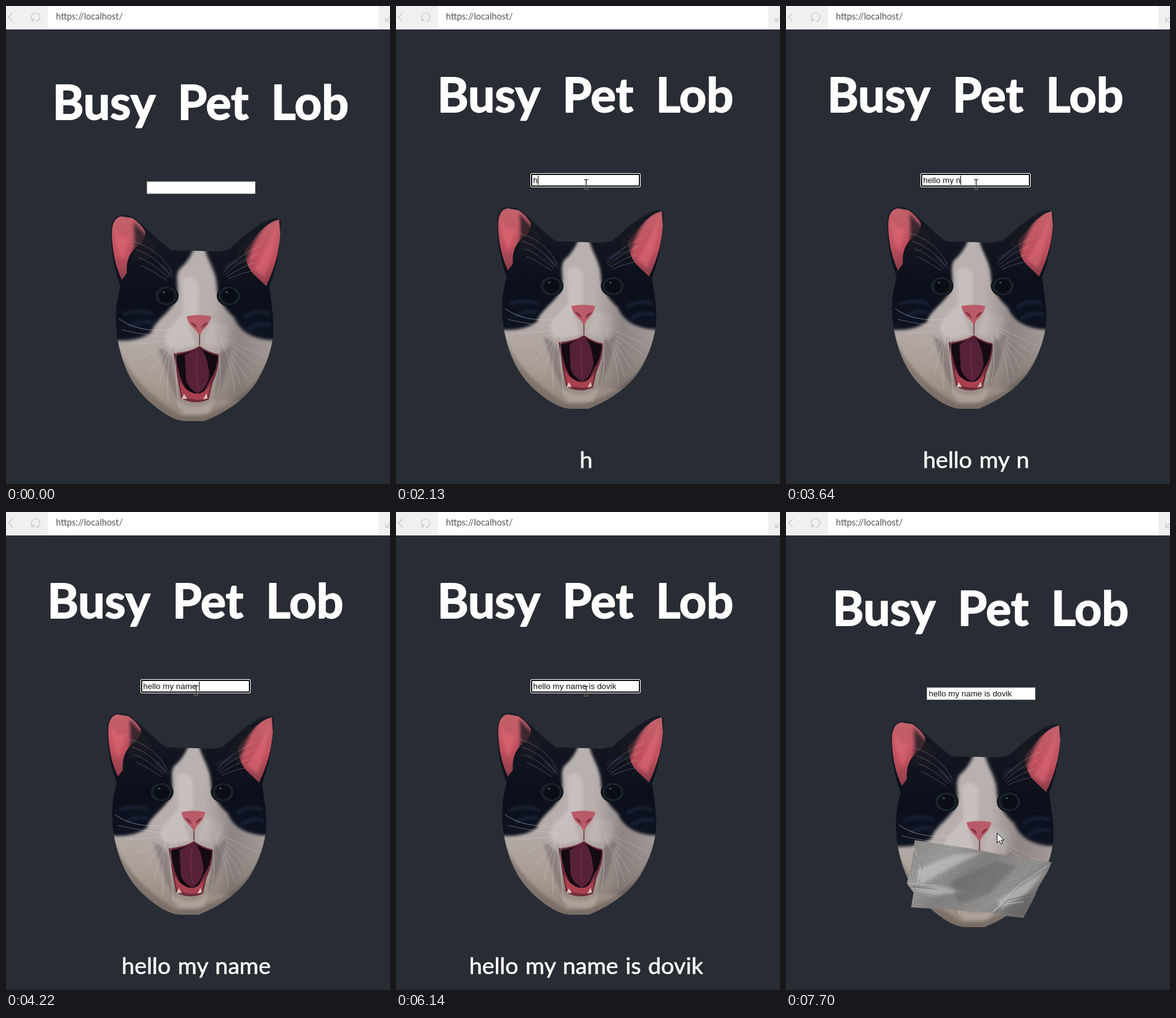
Animation of 623x775 px, one loop 8000 ms. Source, as an HTML page:

```html
<!DOCTYPE html>
<html lang="en">
<head>
<meta charset="utf-8">
<title>Talking cat</title>
<style>
  html, body { margin: 0; width: 100%; height: 100%; overflow: hidden; background: #282c34; }
  svg { display: block; width: 623px; height: 775px; }
  text { white-space: pre; }
  .hand { font-family: Lato, "Open Sans", sans-serif; fill: #fff; stroke: #fff; stroke-linejoin: round; text-anchor: middle; }
  #title { font-size: 77px; font-weight: 700; stroke-width: 1.8; }
  #caption { font-size: 37.5px; word-spacing: 2px; stroke-width: .6; }
  #url { font: 14.4px Lato, sans-serif; fill: #555; }
  #field { font: 13.333px "Liberation Sans", Arial, sans-serif; fill: #111; }
  .icon { fill: none; stroke: #c6c6c6; stroke-width: 1.2; }
</style>
</head>
<body>
<svg viewBox="0 0 623 775">
  <defs>
    <linearGradient id="cream" x1="0" y1="0" x2="0" y2="1">
      <stop offset="0" stop-color="#b9b1b1"/><stop offset=".45" stop-color="#b8aeab"/>
      <stop offset=".75" stop-color="#a89d95"/><stop offset="1" stop-color="#8b7f78"/>
    </linearGradient>
    <linearGradient id="shade" x1="0" y1="0" x2="1" y2="0">
      <stop offset=".5" stop-color="#3d3538" stop-opacity="0"/><stop offset=".72" stop-color="#3d3538" stop-opacity=".32"/>
      <stop offset="1" stop-color="#3d3538" stop-opacity=".12"/>
    </linearGradient>
    <linearGradient id="fur" x1="0" y1="0" x2="0" y2="1">
      <stop offset="0" stop-color="#1a1c26"/><stop offset=".4" stop-color="#0b0f1a"/><stop offset="1" stop-color="#121b30"/>
    </linearGradient>
    <linearGradient id="ear" x1="0" y1="0" x2="0" y2="1">
      <stop offset="0" stop-color="#c2626a"/><stop offset=".6" stop-color="#c04f5d"/><stop offset="1" stop-color="#8a3c49"/>
    </linearGradient>
    <linearGradient id="silver" x1="0" y1="0" x2="1" y2=".6">
      <stop offset="0" stop-color="#8f8d8c"/><stop offset=".28" stop-color="#a6a4a3"/>
      <stop offset=".5" stop-color="#878584"/><stop offset=".78" stop-color="#9b9998"/><stop offset="1" stop-color="#777574"/>
    </linearGradient>
    <radialGradient id="eye">
      <stop offset="0" stop-color="#090c13"/><stop offset=".6" stop-color="#0d131b"/>
      <stop offset=".8" stop-color="#1c2731"/><stop offset="1" stop-color="#05070d"/>
    </radialGradient>
    <pattern id="weave" width="4" height="4" patternUnits="userSpaceOnUse" patternTransform="rotate(9)">
      <path d="M0 0H4M0 0V4" stroke="#4b4947" stroke-opacity=".5"/>
    </pattern>
    <filter id="soft" x="-10%" y="-10%" width="120%" height="120%"><feGaussianBlur stdDeviation="2.4"/></filter>
    <clipPath id="head">
      <path d="M187 339C173 341 169 354 171 382C172 412 179 436 186 455C178 482 176 506 181 540C188 580 202 613 231 640C252 659 272 672 290 673H322C347 663 387 642 408 607C424 580 435 548 434 516C433 492 429 472 427 456C438 428 446 388 446 349Q443 343 433 344C410 351 386 373 361 395L345 398L312 397L268 396C252 384 236 368 217 351Q202 337 187 339Z"/>
    </clipPath>
    <path id="strip" d="M209 532L300 546L368 559L431 568L424 584L410 607L400 630L385 658L350 654L333 650L270 645L203 641L207 617L196 602L204 569Z"/>
    <path id="bar" fill="none" d="M-3.5 -7.5H-1L0 -6.5L1 -7.5H3.5M0 -6.5V6.5M-3.5 7.5H-1L0 6.5L1 7.5H3.5"/>
  </defs>

  <rect width="623" height="775" fill="#282c34"/>
  <rect width="623" height="38" fill="#f0f0f0"/>
  <rect x="68" width="536" height="38" fill="#fff"/>
  <path class="icon" d="M11 11L4 18L11 25M44 23.7A7 7 0 1 1 48.5 25M40.5 24H44.5V20M623 18L616 25M616 19V25H622"/>
  <text id="url" x="81" y="22">https://localhost/</text>

  <g id="title" class="hand">
    <text x="159" y="184">Busy</text><text x="336" y="184">Pet</text><text x="493" y="184">Lob</text>
  </g>

  <g id="cat">
    <g clip-path="url(#head)">
      <rect x="165" y="335" width="285" height="342" fill="url(#fur)"/>
      <path fill="none" stroke="#26344f" stroke-width="5" opacity=".55" filter="url(#soft)" d="M190 500Q215 490 240 500M200 520Q222 508 238 514M385 505Q408 490 428 500M392 525Q412 510 430 518M250 420L272 440M352 425L384 410"/>
      <g filter="url(#soft)">
        <path fill="url(#cream)" d="M306 390H322C326 412 340 428 342 450C342 475 356 492 370 505C380 530 404 542 440 542V680H170V541C195 545 220 541 236 529C240 512 263 499 274 480C284 461 272 442 281 427Q298 413 306 390Z"/>
        <path fill="#d2cbcc" opacity=".6" d="M286 445Q300 430 312 450L312 498L295 512L308 550L278 557Q250 550 261 528L288 498Z"/>
        <path fill="#c9c2c4" opacity=".5" d="M334 512L362 518Q367 548 341 555L318 548Z"/>
        <path fill="#4d4345" opacity=".35" d="M246 553Q275 562 273 590L282 642L268 620ZM346 562L368 549L354 605L338 640Z"/>
        <path fill="#c4bab2" opacity=".5" d="M276 640Q312 662 340 636L330 662H288Z"/>
        <path fill="#5d504b" opacity=".45" d="M176 540Q202 615 284 664H316Q397 638 425 575L440 680H170Z"/>
        <path fill="url(#shade)" d="M275 395H340L346 480L372 505Q384 540 434 542V640H230L275 500Z"/>
      </g>
      <path fill="url(#ear)" d="M187 341Q170 344 172 376Q174 415 188 444L196 433Q194 405 212 390Q226 382 226 366Q218 352 205 344Z"/>
      <path fill="url(#ear)" d="M443 346Q426 350 409 369L387 396Q388 420 402 435L422 454Q442 413 445 370Z"/>
      <g filter="url(#soft)">
        <path fill="#171922" opacity=".8" d="M207 350L246 390L230 412L203 412Q212 387 207 350ZM424 352L372 397L388 427Q398 381 424 352Z"/>
        <path fill="#e06c76" opacity=".6" d="M176 356Q185 380 201 374L190 412Q176 390 176 356ZM440 352Q438 391 419 440L402 426Q424 394 440 352Z"/>
      </g>
    </g>
    <g id="eyes"></g>
    <path fill="#b95b68" d="M293 503Q313 499 333 503Q331 515 319 526L314 535L308 526Q295 515 293 503Z"/>
    <path fill="#6b2835" d="M299 513Q308 514 310 523ZM328 513Q319 514 317 523Z"/>
    <path fill="none" stroke="#794951" stroke-width="2" d="M314 533V550"/>
    <g>
      <path fill="#6f2c3a" d="M272 563Q299 561 314 551Q327 561 346 565Q345 590 335 612L329 638Q306 648 284 636L278 603Z"/>
      <path fill="#140a12" d="M274 566Q302 562 314 553Q326 563 344 567Q342 592 331 606L320 628H294L282 600Z"/>
      <path fill="#552138" d="M290 566Q306 558 314 553Q327 564 330 599Q325 622 311 628Q295 620 292 605Z"/>
      <path fill="none" stroke="#6b2b41" stroke-width="2" d="M310 563Q307 596 312 622"/>
      <path fill="#a8414f" d="M281 607Q294 629 313 629Q326 624 332 612L327 636Q307 642 286 632Z"/>
      <path fill="#d4c3bd" d="M285 637L289 629L294 637ZM320 638L325 628L327 636Z"/>
    </g>
    <g id="whiskers" fill="none" stroke="#d5d0d0" stroke-width="1"></g>
    <g id="tape">
      <use href="#strip" fill="url(#silver)"/>
      <use href="#strip" fill="url(#weave)"/>
      <path fill="#d6d4d3" opacity=".5" filter="url(#soft)" d="M214 580L270 556L316 552L263 579L218 604ZM342 630L376 609L421 581L393 616L349 643ZM206 612L250 606L290 616L240 622Z"/>
      <path fill="#4f4d4b" opacity=".3" filter="url(#soft)" d="M268 600L340 566L374 574L330 618L280 636ZM392 622L410 607L385 656L345 650Z"/>
      <path fill="none" stroke="#d0cecc" opacity=".8" d="M199 602L245 606M207 543L218 574L213 602M424 574L378 604L335 649M333 650L350 637L385 632"/>
      <path fill="none" stroke="#4f4c4a" opacity=".6" d="M203 607L245 612M211 558L221 577M398 620L360 629L338 651"/>
    </g>
  </g>

  <g id="input">
    <rect x="228" y="284" width="177" height="21" fill="#767676"/>
    <rect x="229" y="285" width="175" height="19" fill="#fff"/>
    <g id="ring">
      <rect x="227" y="283" width="179" height="23" rx="3" fill="#fff"/>
      <rect x="228" y="284" width="177" height="21" rx="2" fill="#101010"/>
      <rect x="230" y="286" width="173" height="17" fill="#fff"/>
    </g>
    <text id="field" x="231.5" y="299"></text>
    <rect id="caret" y="287" width="1" height="15" fill="#000"/>
  </g>

  <text id="caption" class="hand" x="308.5" y="749"></text>

  <circle id="halo" r="12" fill="#dedc00" opacity=".8"/>
  <g id="beam">
    <use href="#bar" stroke="#fff" stroke-width="2.4" opacity=".5"/>
    <use href="#bar" stroke="#111" stroke-width="1.2"/>
  </g>
  <path id="arrow" d="M.5 .5V16.5L4.2 13L6.8 18.5L9.3 17.3L6.8 12H11.8Z" fill="#fff" stroke="#111"/>
</svg>
<script>
const LOOP = 8000;
const PHRASE = 'hello my name is dovik';
const KEY_TIMES = [2130, 2360, 2460, 2560, 2730, 2930, 3160, 3300, 3440, 3640, 3910,
  4050, 4140, 4220, 4360, 4460, 4600, 4900, 5000, 5070, 5130, 5200];
const FOCUS = 1460, TYPING = 2130, BLUR = 7560, SILENT = 7700, BLINK = 535;

const $ = id => document.getElementById(id);
const show = (id, on) => $(id).setAttribute('visibility', on ? 'visible' : 'hidden');
const move = (id, x, y, extra = '') => $(id).setAttribute('transform', `translate(${x} ${y})${extra}`);
const within = (t, from, to) => t >= from && t < to;
const mix = (a, b, p) => a + (b - a) * p;

// Progress from 0 to 1 that jumps at each of `count` evenly spaced times.
const stepped = (t, from, to, count) =>
  Math.min(1, Math.floor((t - from) / (to - from) * (count - 1) + .01) / (count - 1));

function drawFace() {
  $('eyes').innerHTML = [[260, 470], [362, 470]].map(([x, y]) => `
    <ellipse cx="${x}" cy="${y}" rx="20" ry="17" fill="url(#eye)"/>
    <circle cx="${x + 1}" cy="${y}" r="12" fill="#090d14"/>
    <ellipse cx="${x - 4}" cy="${y - 6}" rx="2" ry="1.5" fill="#66717f" opacity=".7"/>`).join('');

  let hairs = '';
  const hair = (d, opacity) => hairs += `<path d="${d}" opacity="${opacity}"/>`;
  for (let i = 0; i < 6; i++) {
    hair(`M${272 - i} ${538 + i * 3}Q${230 + i * 6} ${535 + i * 13} ${188 + i * 15} ${525 + i * 23}`, .42);
    hair(`M${346 + i} ${535 + i * 3}Q${380 - i * 2} ${550 + i * 8} ${421 - i * 10} ${570 + i * 12}`, .38);
  }
  for (let i = 0; i < 4; i++) {
    hair(`M${270 - i * 3} ${433 + i * 4}Q${250 - i * 8} ${395 + i * 9} ${207 + i * 4} ${382 + i * 13}`, .3);
    hair(`M${352 + i * 3} ${433 + i * 3}Q${370 + i * 5} ${408 + i * 8} ${414 - i * 5} ${388 + i * 14}`, .3);
  }
  hair('M268 525Q214 530 183 507', .55);
  hair('M276 554Q274 610 281 652', .55);
  hair('M344 555Q352 603 342 630', .55);
  $('whiskers').innerHTML = hairs;
}

function pointer(t) {
  if (t < 300) return null;
  if (t < 690) {
    const p = stepped(t, 300, 550, 8), eased = p * (2 - p);
    const y = mix(760, 287, eased);
    return { kind: y < 304 ? 'beam' : 'arrow', x: mix(566, 310, eased), y };
  }
  if (t < 720) return { kind: 'beam', x: 310, y: 286 };
  if (t < 860) return { kind: 'beam', x: 310, y: 285 };
  if (t < 890) return { kind: 'beam', x: 309, y: 287 };
  if (t < 4900) return { kind: 'beam', x: 308.5, y: 289 };
  if (t < 6140) return { kind: 'arrow', x: 306, y: 288 };
  const p = stepped(t, 6140, 6350, 7), eased = p * p * (3 - 2 * p);
  return p === 0 ? { kind: 'beam', x: 308.5, y: 290 }
    : { kind: 'arrow', x: mix(308, 342, eased), y: mix(290, 520, eased) };
}

function render(t) {
  const raised = within(t, TYPING, SILENT);
  const focused = within(t, FOCUS, BLUR);
  const typed = PHRASE.slice(0, KEY_TIMES.filter(k => k <= t).length);

  move('title', raised ? -8.5 : 0, raised ? -12 : 0);
  move('input', raised ? -9 : 0, raised ? -12 : 0);
  if (raised) move('cat', -2.2, -5.9, ' scale(.978 .979)');
  else move('cat', 0, 0);
  show('tape', t >= SILENT);
  show('ring', focused);

  $('field').textContent = typed;
  $('caption').textContent = raised ? typed.trimEnd() : '';

  const lastInput = Math.max(FOCUS, ...KEY_TIMES.filter(k => k <= t));
  show('caret', focused && Math.floor((t - lastInput) / BLINK) % 2 === 0);
  $('caret').setAttribute('x', Math.round(231.6 + (typed ? $('field').getComputedTextLength() : 0)));

  const at = pointer(t);
  for (const kind of ['beam', 'arrow']) {
    show(kind, at && at.kind === kind);
    if (at) move(kind, at.x, at.y);
  }
  const firstClick = within(t, 1420, 1530);
  show('halo', firstClick || within(t, BLUR, SILENT));
  move('halo', firstClick ? 306 : 342, firstClick ? 288 : 520);
}

drawFace();
const start = performance.now();
(function frame() {
  render((performance.now() - start) % LOOP);
  requestAnimationFrame(frame);
})();
</script>
</body>
</html>
```
